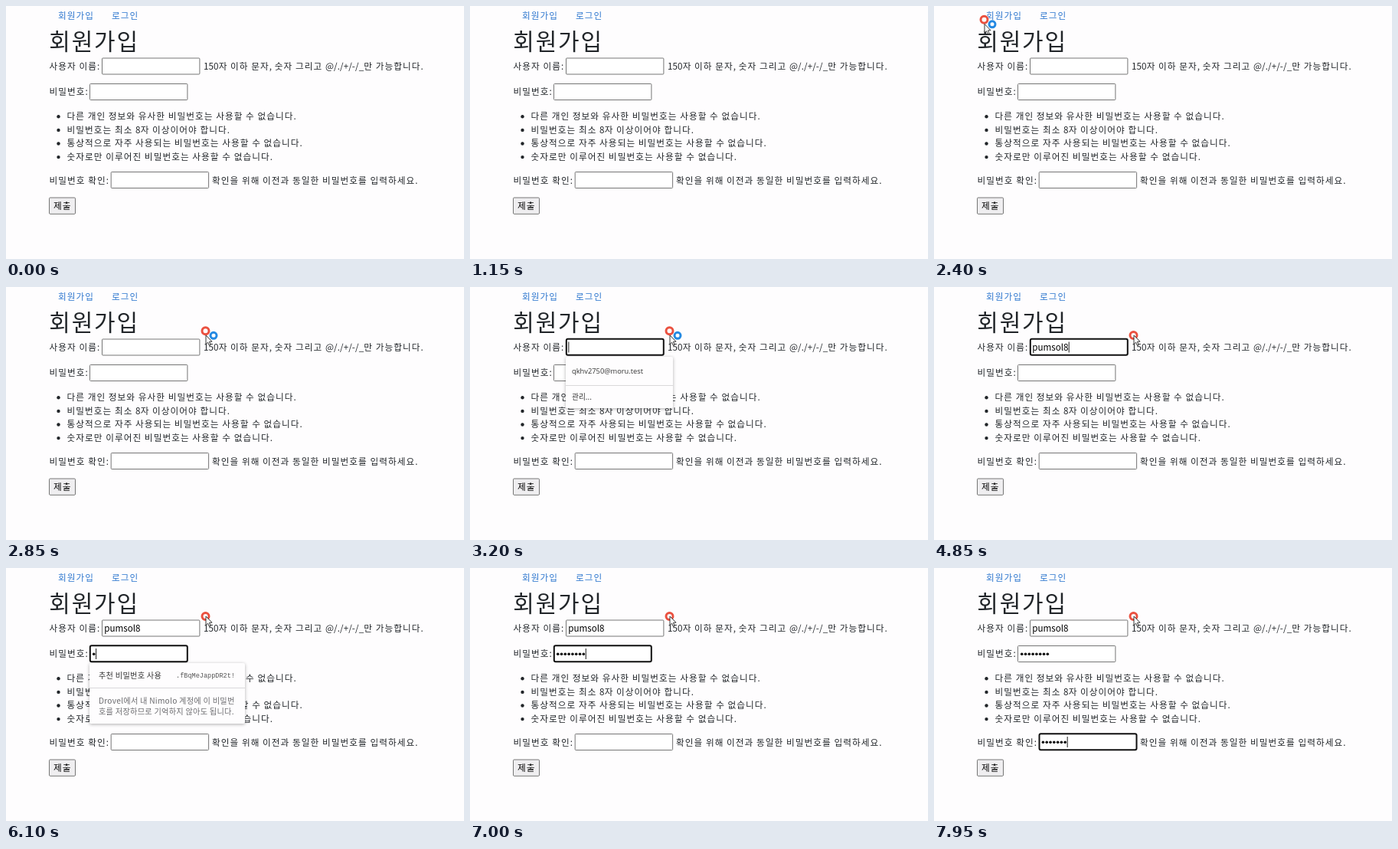
An HTML page with a canvas that plays this animation: 598x330 px, repeating every 8000 ms.

```html
<!DOCTYPE html>
<html lang="ko">
<head>
<meta charset="utf-8">
<title>회원가입</title>
<style>
html, body { margin: 0; width: 100%; height: 100%; overflow: hidden; background: #fefdfe; }
canvas { display: block; width: 598px; height: 330px; }
</style>
</head>
<body>
<canvas id="stage"></canvas>
<script>
const W = 598, H = 330, LOOP = 8000;
const canvas = document.getElementById('stage');
const ctx = canvas.getContext('2d');
const dpr = window.devicePixelRatio || 1;
canvas.width = W * dpr;
canvas.height = H * dpr;

const KR = '"Noto Sans CJK KR", "Noto Sans CJK", "Noto Sans", sans-serif';
const LATIN = '"Open Sans", "Noto Sans CJK KR", sans-serif';
const MONO = '"Liberation Mono", monospace';
const BODY = 11.65, INK = '#212529', LINK = '#2f78cf';
const USER = 'pumsol8', DOT = 4.8;

// Key times in ms
const userKeys = [3900, 4030, 4160, 4300, 4430, 4560, 4720];
const passKeys = [6050, 6250, 6350, 6500, 6600, 6700, 6820, 6950];
const againKeys = [7350, 7450, 7550, 7650, 7750, 7850, 7950];
const focusTimes = [2900, 5350, 7200];
const BUSY_END = 3500;

const fields = [
  { x: 125, y: 67.5, keys: userKeys },
  { x: 109, y: 101, keys: passKeys },
  { x: 136.7, y: 216, keys: againKeys }
];

const path = [
  { t: 2100, x: 39, y: 5 },
  { t: 2400, x: 66, y: 23.5 },
  { t: 2850, x: 261, y: 63 }
];

function text(str, x, mid, size = BODY, color = INK, font = KR, gap = 0) {
  ctx.font = `${size}px ${font}`;
  ctx.letterSpacing = `${gap}px`;
  ctx.fillStyle = color;
  ctx.fillText(str, x, mid + size * 0.38);
  return ctx.measureText(str).width;
}

// Page copy: spaced Hangul, plain Latin
function copy(str, x, mid, color = INK) {
  for (const run of str.split(/([\x21-\x7e]+)/)) {
    if (!run) continue;
    const gap = /^[\x21-\x7e]/.test(run) ? 0.1 : BODY * 0.09;
    x += text(run, x, mid, BODY, color, KR, gap);
  }
}

function box(x, y, w, h, r, fill, stroke, line = 1) {
  ctx.beginPath();
  ctx.roundRect(x, y, w, h, r);
  if (fill) { ctx.fillStyle = fill; ctx.fill(); }
  if (stroke) { ctx.strokeStyle = stroke; ctx.lineWidth = line; ctx.stroke(); }
}

function disc(x, y, r, fill) {
  ctx.beginPath();
  ctx.arc(x, y, r, 0, Math.PI * 2);
  ctx.fillStyle = fill;
  ctx.fill();
}

function ring(x, y, r, width, color) {
  disc(x, y, r + width / 2 + 0.6, 'rgba(255,255,255,.75)');
  ctx.beginPath();
  ctx.arc(x, y, r, 0, Math.PI * 2);
  ctx.strokeStyle = color;
  ctx.lineWidth = width;
  ctx.stroke();
}

function card(x, y, w, h, divider) {
  ctx.save();
  ctx.shadowColor = 'rgba(0,0,0,.32)';
  ctx.shadowBlur = 4 * dpr;
  ctx.shadowOffsetY = dpr;
  box(x, y, w, h, 2, '#fefdfe');
  ctx.restore();
  ctx.fillStyle = '#d9d8da';
  ctx.fillRect(x, divider, w, 1);
}

function page() {
  ctx.fillStyle = '#fefdfe';
  ctx.fillRect(0, 0, W, H);
  copy('회원가입', 68, 12.5, LINK);
  copy('로그인', 138, 12.5, LINK);
  text('회원가입', 56.3, 45.5, 30, INK, KR, 1.8);
  copy('사용자 이름:', 56.5, 78.5);
  copy('150자 이하 문자, 숫자 그리고 @/./+/-/_만 가능합니다.', 258, 78.5);
  copy('비밀번호:', 56.5, 112);
  [
    '다른 개인 정보와 유사한 비밀번호는 사용할 수 없습니다.',
    '비밀번호는 최소 8자 이상이어야 합니다.',
    '통상적으로 자주 사용되는 비밀번호는 사용할 수 없습니다.',
    '숫자로만 이루어진 비밀번호는 사용할 수 없습니다.'
  ].forEach((line, i) => {
    const mid = 143.5 + i * 17.6;
    disc(68.5, mid + 0.8, 2.2, INK);
    copy(line, 79.5, mid);
  });
  copy('비밀번호 확인:', 56.5, 227.3);
  copy('확인을 위해 이전과 동일한 비밀번호를 입력하세요.', 269, 227.3);
  box(56.5, 250, 34, 21.3, 1.2, '#efeef0', '#767676');
  copy('제출', 62, 261, '#000');
}

function field(i, active, t) {
  const { x, y, keys } = fields[i];
  const typed = keys.filter(k => k <= t).length;
  if (active) box(x + 0.8, y + 0.3, 127, 21, 2, '#fff', '#101010', 2);
  else box(x + 0.5, y + 0.5, 127.4, 21, 1, '#fff', '#767676');

  const left = x + 3.2, mid = y + 10.8;
  let end = left;
  if (i === 0) {
    if (typed) end += text(USER.slice(0, typed), left, mid, BODY, '#000');
  } else {
    for (let n = 0; n < typed; n++) disc(left + 2.5 + n * DOT, mid + 0.4, 1.75, '#000');
    end += typed * DOT;
  }
  const last = Math.max(focusTimes[i], typed ? keys[typed - 1] : 0);
  if (active && (t - last) % 1000 < 500) {
    ctx.fillStyle = '#000';
    ctx.fillRect(end + 0.2, y + 4, 0.9, 14);
  }
}

function accountMenu() {
  card(125, 91, 140, 67, 128);
  text('qkhv2750@moru.test', 133, 109.5, 9.3, '#333', LATIN);
  text('관리...', 133, 143.5, 9.7, '#333');
}

function passwordMenu() {
  card(109, 124, 203, 79, 156);
  text('추천 비밀번호 사용', 121, 140, 10.2, '#333', KR, 0.25);
  text('.fBqMeJappDR2t!', 222, 140, 8.55, '#555', MONO);
  text('Drovel에서 내 Nimolo 계정에 이 비밀번', 121, 173, 10.2, '#6b6b6e', KR, 0.25);
  text('호를 저장하므로 기억하지 않아도 됩니다.', 121, 187, 10.2, '#6b6b6e', KR, 0.25);
}

function pointerAt(t) {
  const i = path.findIndex(p => p.t > t);
  if (i < 0) return path[path.length - 1];
  const a = path[i - 1], b = path[i];
  const u = (t - a.t) / (b.t - a.t), e = u * u * (3 - 2 * u);
  return { x: a.x + (b.x - a.x) * e, y: a.y + (b.y - a.y) * e };
}

function pointer(t) {
  const { x, y } = pointerAt(t);
  const busy = t < BUSY_END;
  ring(x - 0.5, busy ? y - 5.7 : y, 4.5, 3, '#ea5140');
  if (busy) ring(x + 10, y + 0.3, 4, 3, '#2489e2');
  ctx.beginPath();
  ctx.moveTo(x, y);
  for (const [dx, dy] of [[0, 11.5], [2.6, 9.2], [4.4, 13.2], [6.2, 12.4], [4.5, 8.4], [8, 8.2]]) {
    ctx.lineTo(x + dx, y + dy);
  }
  ctx.closePath();
  ctx.fillStyle = '#fff';
  ctx.fill();
  ctx.strokeStyle = '#222';
  ctx.lineWidth = 0.9;
  ctx.stroke();
}

function draw(t) {
  ctx.setTransform(dpr, 0, 0, dpr, 0, 0);
  page();
  const active = focusTimes.filter(f => f <= t).length - 1;
  fields.forEach((_, i) => field(i, i === active, t));
  if (t >= 3000 && t < userKeys[0]) accountMenu();
  if (t >= 5500 && t < passKeys[4]) passwordMenu();
  if (t >= path[0].t) pointer(t);
}

function tick() {
  draw(performance.now() % LOOP);
  requestAnimationFrame(tick);
}
tick();
</script>
</body>
</html>
```
